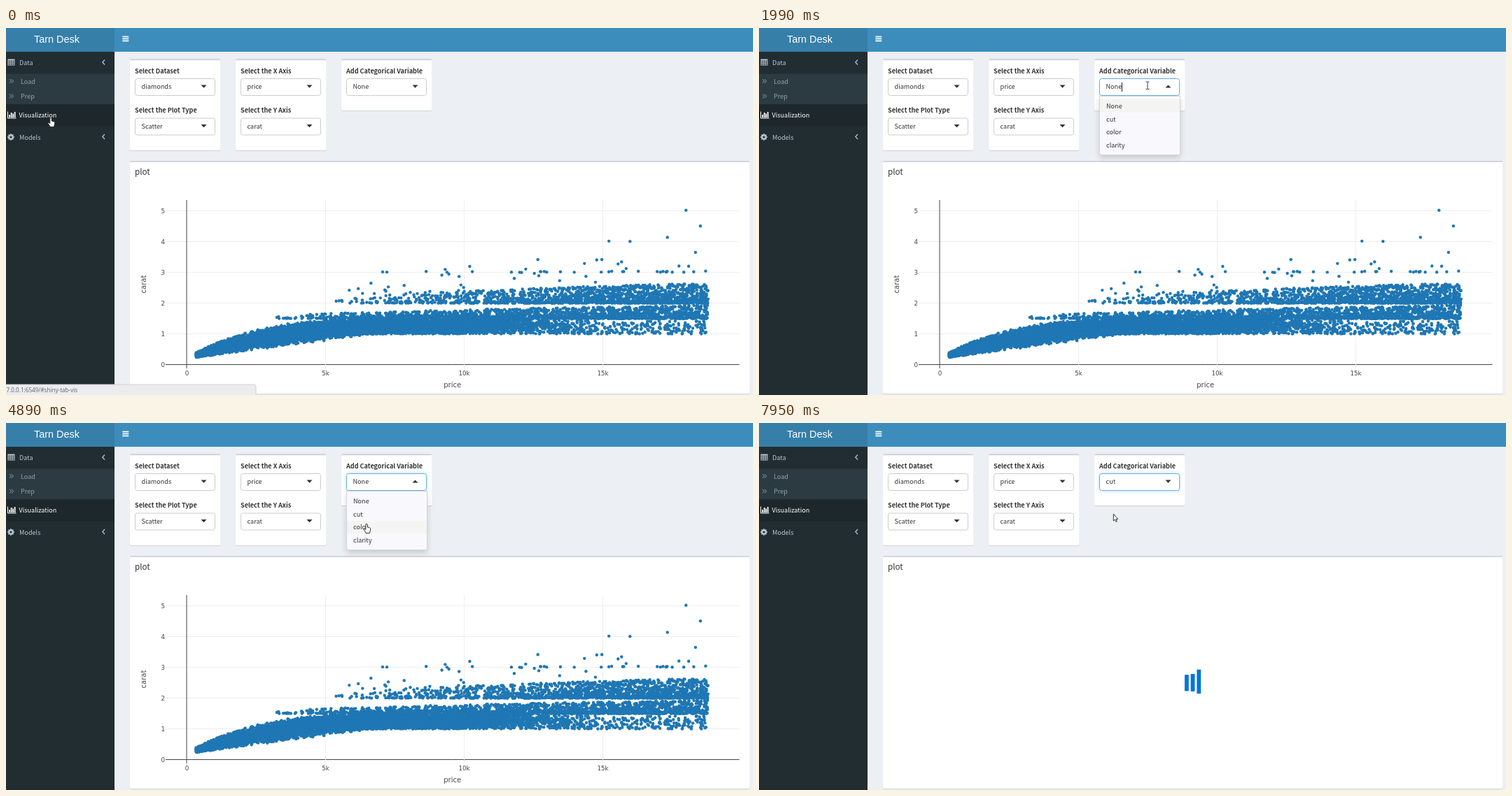
An HTML page with a canvas that plays this animation: 1067 px wide and 525 px high, repeating every 8 s.

```html
<!DOCTYPE html>
<html lang="en">
<head>
<meta charset="utf-8">
<title>Scatter plot dashboard</title>
<style>
html, body { margin: 0; width: 100%; height: 100%; overflow: hidden; background: #ecf0f5; }
canvas { display: block; }
</style>
</head>
<body>
<canvas id="stage" width="1067" height="525"></canvas>
<script>
const LOOP = 8000, OPEN = 1990, CHOSEN = 5520, RELOAD = 7480, BLINK = 540;
const SANS = '"Noto Sans CJK JP", "Noto Sans CJK SC", "Noto Sans CJK", sans-serif';
const UI = '9.1px ' + SANS, BOLD = 'bold ' + UI;
const TICK = '8.7px "DejaVu Sans", sans-serif', AXIS = '10.1px "DejaVu Sans", sans-serif';
const stage = document.getElementById('stage');
let g = stage.getContext('2d');

const lerp = (a, b, k) => a + (b - a) * k;
const clamp = k => Math.min(1, Math.max(0, k));
const ease = k => k * k * (3 - 2 * k);

function rect(x, y, w, h, color) {
  g.fillStyle = color;
  g.fillRect(x, y, w, h);
}
function text(str, x, y, color, font = UI, align = 'left') {
  g.font = font;
  g.textAlign = align;
  g.fillStyle = color;
  g.fillText(str, x, y);
}
function line(points, color, width = 1) {
  g.beginPath();
  points.forEach(([x, y]) => g.lineTo(x, y));
  g.strokeStyle = color;
  g.lineWidth = width;
  g.stroke();
}
function shadow(color, blur, dy) {
  g.shadowColor = color;
  g.shadowBlur = blur;
  g.shadowOffsetY = dy;
}
// Only the fill casts a shadow
function rounded(x, y, w, h, r, fill, stroke) {
  g.beginPath();
  g.roundRect(x, y, w, h, r);
  g.fillStyle = fill;
  g.fill();
  shadow('transparent', 0, 0);
  if (stroke) {
    g.strokeStyle = stroke;
    g.lineWidth = 1;
    g.stroke();
  }
}

function card(x, y, w, h) {
  shadow('rgba(0,0,0,.12)', 1, 1);
  rounded(x, y, w, h, 2, '#fff');
  rounded(x, y, w, 2.2, [2, 2, 0, 0], '#d2d6de');
}

function picker(x, y, label, value, focus = 0, open = false) {
  text(label, x, y - 7.5, '#333', BOLD);
  if (focus) shadow(`rgba(102,175,233,${0.6 * focus})`, 5.8, 0);
  rounded(x + .5, y + .5, 114, 24, 3, '#fff', focus ? '#66afe9' : '#ccc');
  text(value, x + 9.5, y + 15.3, '#333');
  const tip = open ? 9.5 : 13.8, base = open ? 13.5 : 9.6;
  g.beginPath();
  g.moveTo(x + 94.5, y + base);
  g.lineTo(x + 102.5, y + base);
  g.lineTo(x + 98.5, y + tip);
  g.fillStyle = '#333';
  g.fill();
}

function sidebar() {
  const soft = '#b8c7ce', dim = '#8aa4af';
  rect(0, 34, 155, 491, '#222d32');
  rect(0, 65.5, 155, 43.5, '#2c3b41');
  rect(0, 109, 155, 31.5, '#1e282c');
  text('Data', 19, 53, soft);
  text('Load', 21, 79.7, dim);
  text('Prep', 21, 101, dim);
  text('Visualization', 18.5, 128, '#fff');
  text('Models', 19, 159.7, soft);
  for (const y of [49, 155.5]) line([[141, y - 3.5], [137.8, y], [141, y + 3.5]], soft, 1.2);
  for (const y of [76, 97.5])
    for (const x of [5, 8]) line([[x, y - 2.8], [x + 2.6, y], [x, y + 2.8]], dim, 1);
  // table
  rect(2.5, 44.5, 10, 9, soft);
  for (let i = 0; i < 9; i++) rect(3.5 + i % 3 * 3, 46.6 + (i / 3 | 0) * 2.3, 2.1, 1.4, '#222d32');
  // bar chart
  line([[2.5, 119.5], [2.5, 129], [14.5, 129]], '#fff', 1);
  [4, 7, 5.5, 8].forEach((h, i) => rect(4.3 + i * 2.5, 128 - h, 1.7, h, '#fff'));
  // gear
  g.strokeStyle = soft;
  g.lineWidth = 2.2;
  g.beginPath();
  g.arc(7, 156, 2.7, 0, 7);
  g.stroke();
  for (let i = 0; i < 8; i++) {
    const c = Math.cos(i * Math.PI / 4), s = Math.sin(i * Math.PI / 4);
    line([[7 + 3 * c, 156 + 3 * s], [7 + 4.8 * c, 156 + 4.8 * s]], soft, 1.9);
  }
}

// Prices in thousands, sizes in carats
const plotX = price => 258.5 + 39.6 * price;
const plotY = carat => 481.7 - 44.1 * carat;
const MAX_PRICE = 18.8;

function drawAxes() {
  for (let i = 0; i <= 5; i++) {
    const y = Math.floor(plotY(i)) + .5;
    line([[228, y], [1047.5, y]], i ? '#eee' : '#444');
    text(i, 227, y + 3.2, '#444', TICK, 'right');
  }
  ['0', '5k', '10k', '15k'].forEach((label, i) => {
    const x = plotX(5 * i);
    if (i) line([[x, 246], [x, 487]], '#eee');
    text(label, x, 496.8, '#444', TICK, 'center');
  });
  line([[258, 246], [258, 487]], '#444');
  text('price', 637.7, 514, '#444', AXIS, 'center');
  g.save();
  g.translate(200, 366.5);
  g.rotate(-Math.PI / 2);
  text('carat', 0, 0, '#444', AXIS, 'center');
  g.restore();
}

function drawDiamonds() {
  let seed = 7;
  const random = () => (seed = seed * 16807 % 2147483647) / 2147483647;
  const dot = (price, carat) => {
    g.beginPath();
    g.arc(plotX(price), plotY(carat), 2.2, 0, 7);
    g.fill();
  };
  // Stones gather just above a round size; a low bias crowds them at high prices
  const family = (count, base, spread, from, bias, pull) => {
    for (let i = 0; i < count; i++) {
      const u = random() ** bias;
      dot(lerp(from, MAX_PRICE, u), base + spread * Math.sqrt(u) * random() ** pull);
    }
  };
  g.fillStyle = '#1f77b4';
  // main wedge, thinning out to the right
  for (let i = 0; i < 7000; i++) {
    const price = .33 + 14.5 * (1 - Math.sqrt(random()));
    const low = Math.min(1, .19 + .118 * price);
    const high = .22 + 1.48 * (1 - Math.exp(-price / 2.6));
    dot(price, lerp(low, high, (random() + random()) / 2));
  }
  family(1100, 1, .45, 4.6, 1.9, 1.3);
  family(1700, 1.5, .43, 2.9, .55, 1.8);
  family(1700, 2, .65, 5, .45, 2);
  family(28, 3, .04, 6, .7, 1);
  family(60, 2.3, 1.5, 5, .7, 3);
  [[18, 5.01], [18.52, 4.5], [17.33, 4.13], [15.22, 4.01], [15.98, 4]].forEach(p => dot(...p));
}

const plot = document.createElement('canvas');
plot.width = stage.width;
plot.height = stage.height;
const screen = g;
g = plot.getContext('2d');
drawAxes();
drawDiamonds();
g = screen;

function spinner(t) {
  const em = 5.8, step = 78.4;
  const phase = (Math.floor((t - RELOAD) / step) * step + 90) / 1000;
  const grow = delay => ease(clamp(1 - Math.abs((phase + delay) % 1 - .4) / .4));
  const top = 360.5 - grow(.16) * em / 2;
  [.32, .16, 0].forEach((delay, i) => {
    const k = grow(delay);
    rect(608 + i * 1.5 * em, top - 2 * em * k, em, em * (4 + 3 * k), '#0275d8');
  });
}

// Pointer trips: start, end, x, y of arrival
const trips = [
  [720, 1290, 517.5, 101.5],
  [1290, 1530, 555, 82],
  [3100, 3490, 532, 137.5],
  [4030, 4270, 515, 144],
  [4890, 5140, 506.3, 130]
];
function pointerAt(t) {
  let x = 64, y = 128;
  for (const [start, end, toX, toY] of trips) {
    const k = ease(clamp((t - start) / (end - start)));
    x = lerp(x, toX, k);
    y = lerp(y, toY, k);
  }
  return [x, y];
}

const hand = new Path2D('M-1.2 1Q0-.8 1.2 1V5L4.5 5.8Q6 6.3 5.8 8L5 11 4.5 13.5H-1L-1.5 12-4 8.5Q-4.3 7-2.8 7.4L-1.2 8.8Z');
const arrow = new Path2D('M0 0V10L2.2 8 3.7 11.3 5.1 10.7 3.7 7.4H6.3Z');
const beam = new Path2D('M-2.5-5H-.7L0-4.5 .7-5H2.5M0-4.5V5M-2.5 5.5H-.7L0 5 .7 5.5H2.5');

function pointer(x, y, open) {
  const inPicker = x > 486 && x < 602 && y > 72 && y < 97;
  const shape = inPicker && open ? beam : inPicker || open || x < 155 ? hand : arrow;
  g.save();
  g.translate(x, y);
  g.lineWidth = .9;
  g.strokeStyle = '#222';
  g.fillStyle = '#fff';
  if (shape !== beam) g.fill(shape);
  g.stroke(shape);
  g.restore();
}

function dropdown(y) {
  const rowHeight = 18.8, top = 102;
  shadow('rgba(0,0,0,.175)', 8, 4);
  rounded(486.5, 97.5, 115, 84, [0, 0, 3, 3], '#f9f9fd', '#d5d5da');
  const row = Math.max(0, Math.floor((y - top) / rowHeight));
  rect(487, top + rowHeight * row, 114, rowHeight, '#f4f4f3');
  ['None', 'cut', 'color', 'clarity'].forEach((s, i) => text(s, 496, 114.8 + rowHeight * i, '#333'));
}

function statusBar(alpha) {
  g.globalAlpha = alpha;
  rounded(-1, 510, 358, 17, [0, 3, 0, 0], '#ececee', '#cfd1d3');
  text('7.0.0.1:6549/#shiny-tab-vis', .5, 520.7, '#5f6368', '8.15px "Open Sans", sans-serif');
  g.globalAlpha = 1;
}

function draw(t) {
  const [x, y] = pointerAt(t);
  const open = t >= OPEN && t < CHOSEN;
  rect(0, 0, 1067, 525, '#ecf0f5');
  rect(0, 0, 1067, 34, '#3c8dbc');
  rect(0, 0, 155, 34, '#367fa9');
  text('Tarn Desk', 72.5, 20.8, '#fff', '14.4px "Liberation Sans", Arial, sans-serif', 'center');
  for (let i = 0; i < 3; i++) rect(166.3, 11.6 + i * 3, 9, 1.7, '#fff');
  sidebar();

  card(177, 44, 129.5, 131);
  card(328, 44, 129.5, 131);
  card(479, 44, 129.5, 74);
  card(177, 189.7, 885.5, 333.3);
  picker(184, 72, 'Select Dataset', 'diamonds');
  picker(184, 128.5, 'Select the Plot Type', 'Scatter');
  picker(335, 72, 'Select the X Axis', 'price');
  picker(335, 128.5, 'Select the Y Axis', 'carat');
  const focus = t < OPEN ? 0 : .5 + .5 * clamp((t - OPEN) / 80);
  picker(486, 72, 'Add Categorical Variable', t < CHOSEN ? 'None' : 'cut', focus, open);
  text('plot', 184, 209.7, '#333', '11.65px ' + SANS);

  if (t < RELOAD) g.drawImage(plot, 0, 0);
  else spinner(t);

  if (open) {
    dropdown(y);
    const blinkStart = OPEN - 140;
    if ((t - blinkStart) % (2 * BLINK) < BLINK) rect(518, 78, 1, 13, '#222');
  }
  const alpha = 1 - clamp((t - 1140) / 300);
  if (alpha) statusBar(alpha);
  pointer(x, y, open);
}

function tick() {
  draw(performance.now() % LOOP);
  requestAnimationFrame(tick);
}
tick();
</script>
</body>
</html>
```
